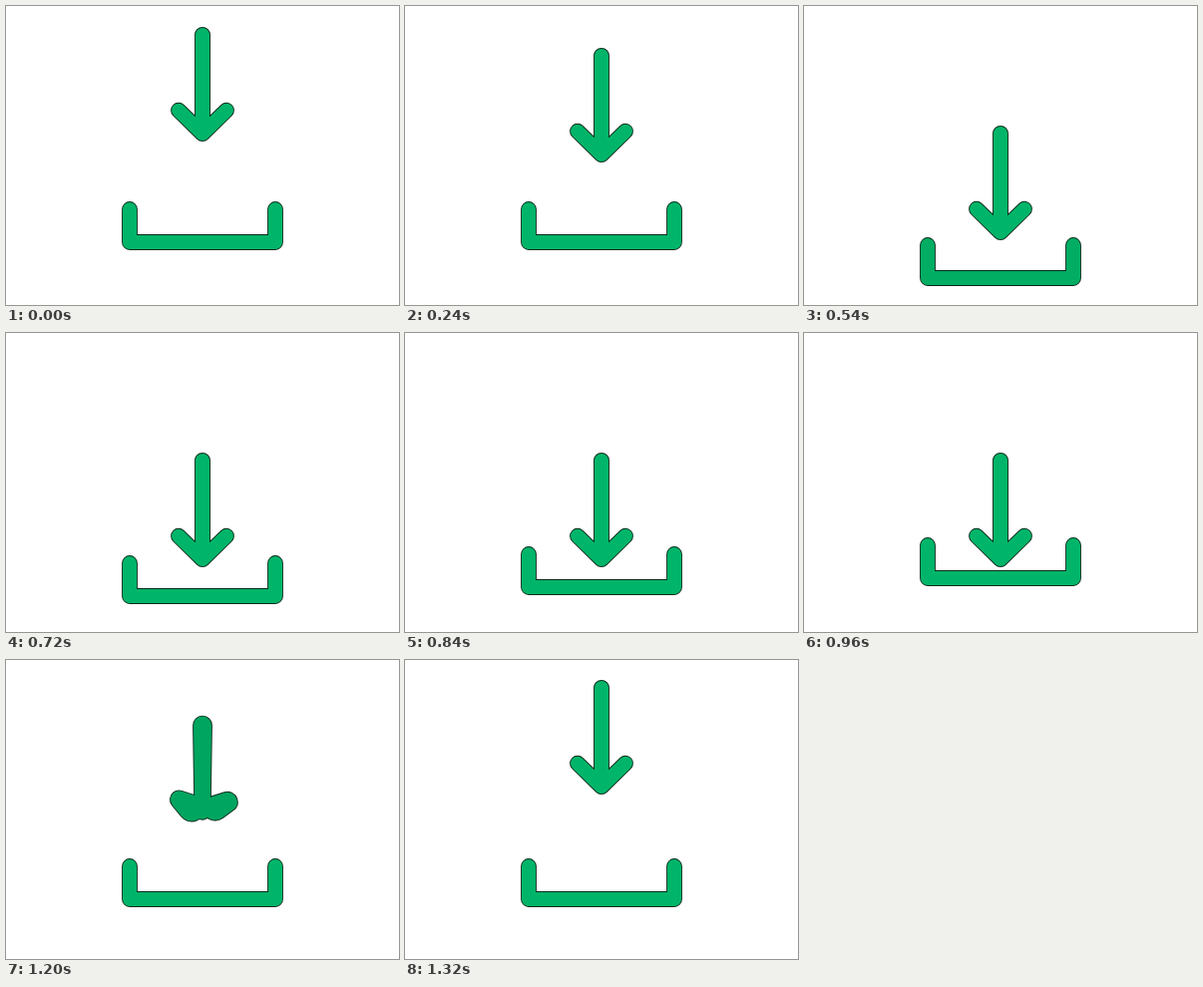
Animation of 394x300 px, one loop 1350 ms. Source, as an HTML page with a canvas:

```html
<!DOCTYPE html>
<html lang="en">
<head>
<meta charset="utf-8">
<title>Download</title>
<style>
  html, body { margin: 0; width: 100%; height: 100%; overflow: hidden; background: #fff; }
  canvas { display: block; }
</style>
</head>
<body>
<canvas id="stage" width="394" height="300"></canvas>
<script>
const ctx = document.getElementById('stage').getContext('2d');
const LOOP = 1350;
const GREEN = [0, 181, 105], DARK = [0, 140, 76], SOFT = [0, 165, 96];
const CENTER = 197;

const progress = (t, from, to) => Math.min(1, Math.max(0, (t - from) / (to - from)));
const mix = (a, b, k) => a.map((v, i) => v + (b[i] - v) * k);
const rgb = c => `rgb(${c.map(Math.round)})`;
const easeOut = (u, power) => 1 - (1 - u) ** power;

// A limb joins two discs [x, y, radius] by their outer tangents.
function addLimb(path, [x1, y1, r1], [x2, y2, r2]) {
  const angle = Math.atan2(y2 - y1, x2 - x1);
  const tangent = Math.acos((r1 - r2) / Math.hypot(x2 - x1, y2 - y1));
  const limb = new Path2D();
  limb.arc(x1, y1, r1, angle + tangent, angle - tangent + 2 * Math.PI);
  limb.arc(x2, y2, r2, angle - tangent, angle + tangent);
  limb.closePath();
  path.addPath(limb);
}

function arrow(t) {
  const drop = 99 * progress(t, 0, 420) ** 2.8;
  const rise = progress(t, 990, 1320);
  const bend = (1 - Math.abs(2 * rise - 1)) / 0.727;
  const pose = (stiff, limp) => mix(stiff, limp, bend);
  const tip = [CENTER, 128, 7.1];
  const path = new Path2D();

  addLimb(path, pose([CENTER, 29, 7.1], [CENTER, 30.6, 9]),
                pose(tip, [CENTER, 117, 7.7]));
  addLimb(path, pose([173, 104.7, 7], [173.5, 105, 8.6]),
                pose(tip, [186, 113.5, 13]));
  addLimb(path, pose([221, 104.7, 7], [222, 107.5, 9.8]),
                pose(tip, [210, 113.5, 12]));

  return { path, y: drop - 100 * rise, color: mix(GREEN, SOFT, Math.min(1, bend)) };
}

function tray(t) {
  const sink = 39 * easeOut(progress(t, 420, 570), 1.5);
  const lift = 36 * easeOut(progress(t, 570, 1080), 1.18);
  const flash = progress(t, 330, 420) - progress(t, 420, 570);
  const [left, right] = [-73, 73].map(dx => CENTER + dx);
  const path = new Path2D();

  for (const x of [left, right]) addLimb(path, [x, 204, 7], [x, 237, 7]);
  addLimb(path, [left, 237, 7], [right, 237, 7]);

  return { path, y: sink - lift, color: mix(GREEN, DARK, flash) };
}

function paint(shape, draw) {
  ctx.save();
  ctx.translate(0, Math.round(shape.y));
  draw(shape);
  ctx.restore();
}

function frame() {
  const t = performance.now() % LOOP;
  const shapes = [arrow(t), tray(t)];
  ctx.fillStyle = '#fff';
  ctx.fillRect(0, 0, 394, 300);

  // Outlines lie below both fills, so touching shapes show no seam.
  ctx.strokeStyle = '#032818';
  ctx.lineWidth = 1.8;
  for (const shape of shapes) paint(shape, s => ctx.stroke(s.path));
  for (const shape of shapes) {
    ctx.fillStyle = rgb(shape.color);
    paint(shape, s => ctx.fill(s.path));
  }
  requestAnimationFrame(frame);
}
frame();
</script>
</body>
</html>
```
